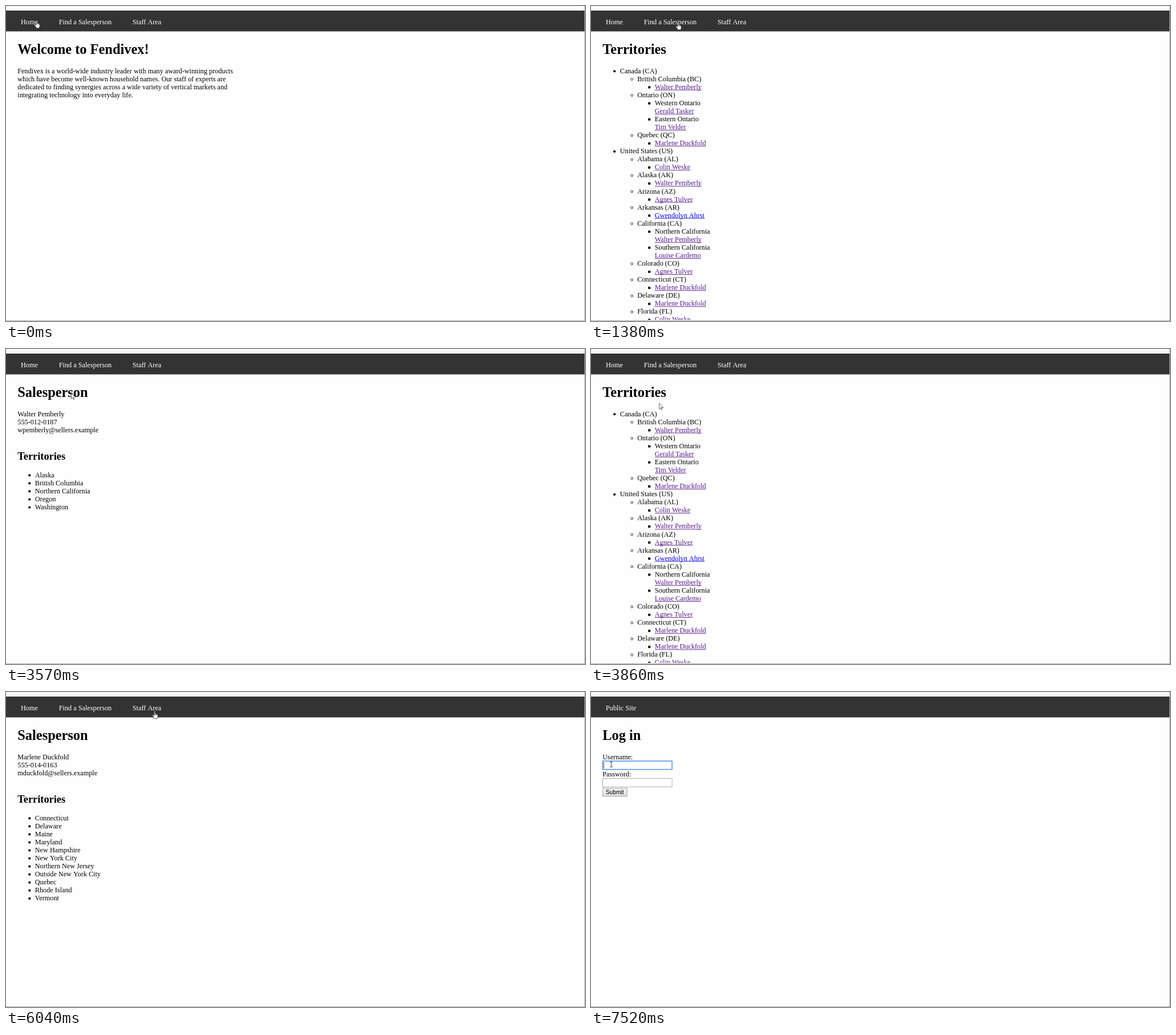
Write an HTML page with a canvas that moves like this. It is 1015x552 px and loops after 8 s.

```html
<!DOCTYPE html>
<html lang="en">
<head>
<meta charset="utf-8">
<title>Sales site walkthrough</title>
<style>
  html, body { margin: 0; width: 100%; height: 100%; overflow: hidden; background: #fefefe; }
  canvas { display: block; }
</style>
</head>
<body>
<canvas id="stage" width="1015" height="552"></canvas>
<script>
const ctx = document.getElementById('stage').getContext('2d');
const LOOP = 8000;
const LINE = 14.06;
const FIRST_LINE = 117.6;
const SERIF = '"Liberation Serif", "Times New Roman", serif';
const BODY = `12.22px ${SERIF}`;
const H1 = `bold 24.4px ${SERIF}`;
const H2 = `bold 18.33px ${SERIF}`;

// Bursts of pointer activity: first change, last change, number of changes.
const bursts = [
  [710, 1380, 5], [1790, 2360, 5], [2490, 2760, 3], [2910, 3300, 4],
  [3570, 3570, 1], [3720, 4570, 7], [4700, 4850, 2], [5000, 5620, 6],
  [5760, 6040, 3], [6160, 6670, 5], [6820, 7520, 6]
];
const changes = [0];
for (const [from, to, count] of bursts) {
  for (let i = 0; i < count; i++) {
    changes.push(Math.round(from + (count > 1 ? (to - from) * i / (count - 1) : 0)));
  }
}

// Pointer path: time, left, top, shape from that time on.
const path = [
  [0, 49, 25, 'hand'], [543, 49, 25, 'hand'], [1212, 148, 28, 'hand'],
  [1650, 148, 28, 'hand'], [1790, 150, 48, 'arrow'], [2075, 160, 136, 'hand'],
  [2217, 160, 136, 'hand'], [2360, 164.5, 141, 'beam'], [2490, 205, 168, 'arrow'],
  [2625, 224, 182, 'arrow'], [2760, 154, 219, 'arrow'], [2910, 140, 150, 'arrow'],
  [3300, 96.5, 24.5, 'hand'], [3570, 114, 77, 'arrow'], [4570, 150, 195, 'arrow'],
  [4850, 158, 227, 'arrow'], [5000, 162, 236, 'hand'], [5124, 162, 236, 'arrow'],
  [5620, 256, 35, 'hand'], [5760, 257, 28, 'hand'], [5900, 257, 23, 'hand'],
  [6040, 256, 33, 'hand'], [6160, 205, 60, 'arrow'], [6415, 115, 104, 'beam'],
  [6542, 165, 70, 'arrow'], [6670, 230, 30, 'hand'], [6820, 266, 24, 'hand'],
  [6960, 266, 24, 'arrow'], [7380, 33, 122, 'beam'], [8000, 33, 122, 'beam']
];

const links = {
  W: 'Walter Pemberly', G: 'Gerald Tasker', T: 'Tim Velder', M: 'Marlene Duckfold',
  C: 'Colin Weske', A: 'Agnes Tulver', E: 'Gwendolyn Ahrst', L: 'Louise Cardemo'
};

// Leading mark: * o # bullets by depth, _ continues the deepest level.
const territories = [
  '*Canada (CA)', 'oBritish Columbia (BC)', '#W', 'oOntario (ON)',
  '#Western Ontario', '_G', '#Eastern Ontario', '_T', 'oQuebec (QC)', '#M',
  '*United States (US)', 'oAlabama (AL)', '#C', 'oAlaska (AK)', '#W',
  'oArizona (AZ)', '#A', 'oArkansas (AR)', '#E', 'oCalifornia (CA)',
  '#Northern California', '_W', '#Southern California', '_L',
  'oColorado (CO)', '#A', 'oConnecticut (CT)', '#M', 'oDelaware (DE)', '#M',
  'oFlorida (FL)', '#C'
];

function text(str, x, y, font = BODY, color = '#000') {
  ctx.font = font;
  ctx.fillStyle = color;
  ctx.fillText(str, x, y);
}

function lines(list, x, y) {
  list.forEach((str, i) => text(str, x, y + i * LINE));
}

function link(str, x, y, color) {
  text(str, x, y, BODY, color);
  ctx.fillRect(x, y + 1, ctx.measureText(str).width, 0.9);
}

function bullet(mark, x, y) {
  ctx.fillStyle = ctx.strokeStyle = '#000';
  ctx.lineWidth = 0.8;
  if (mark === '#') {
    ctx.fillRect(x - 2, y - 2, 4, 4);
    return;
  }
  ctx.beginPath();
  ctx.arc(x, y, mark === '*' ? 2.1 : 1.9, 0, Math.PI * 2);
  if (mark === '*') ctx.fill();
  else ctx.stroke();
}

function listItem(item, y) {
  const mark = item[0];
  const label = item.slice(1);
  const depth = mark === '*' ? 0 : mark === 'o' ? 1 : 2;
  const x = 50.8 + depth * 30.5;
  if (mark !== '_') bullet(mark, x - 9.6, y - 3.3);
  if (links[label]) link(links[label], x, y, label === 'E' ? '#0000ee' : '#551a8b');
  else text(label, x, y);
}

function listItems(items, top) {
  items.forEach((item, i) => listItem(item, top + i * LINE));
}

function nav(items) {
  ctx.fillStyle = '#333';
  ctx.fillRect(0, 8, 1014, 36.5);
  for (const [label, x] of items) text(label, x, 31.5, BODY, '#fff');
}

function publicPage(title) {
  nav([['Home', 26], ['Find a Salesperson', 92.8], ['Staff Area', 221.8]]);
  text(title, 20.3, 83.8, H1);
}

function homePage() {
  publicPage('Welcome to Fendivex!');
  lines([
    'Fendivex is a world-wide industry leader with many award-winning products',
    'which have become well-known household names. Our staff of experts are',
    'dedicated to finding synergies across a wide variety of vertical markets and',
    'integrating technology into everyday life.'
  ], 20.3, FIRST_LINE);
}

function territoriesPage() {
  publicPage('Territories');
  listItems(territories, FIRST_LINE);
}

function salespersonPage(contact, areas) {
  publicPage('Salesperson');
  lines(contact, 20.3, FIRST_LINE);
  text('Territories', 20.3, 193.8, H2);
  listItems(areas.map(area => '*' + area), 224.6);
}

function inputBox(y, focused) {
  ctx.fillStyle = '#fff';
  ctx.fillRect(20, y, 122.5, 15.5);
  ctx.strokeStyle = focused ? '#4d90f0' : '#adadad';
  ctx.lineWidth = focused ? 1.5 : 1;
  ctx.strokeRect(20.5, y + 0.5, 121.6, 14.7);
}

function loginPage(t) {
  const focused = t >= 7520;
  nav([['Public Site', 26]]);
  text('Log in', 20.3, 83.8, H1);
  text('Username:', 20.3, FIRST_LINE);
  inputBox(120.5, focused);
  if (focused) {
    ctx.fillStyle = '#333';
    ctx.fillRect(21.8, 123, 0.9, 10.5);
  }
  text('Password:', 20.3, 148.4);
  inputBox(151, false);

  const shade = ctx.createLinearGradient(0, 168, 0, 183);
  shade.addColorStop(0, '#f6f6f6');
  shade.addColorStop(1, '#dcdcdc');
  ctx.fillStyle = shade;
  ctx.fillRect(20, 168, 43.5, 15.2);
  ctx.strokeStyle = '#a3a3a3';
  ctx.lineWidth = 1;
  ctx.strokeRect(20.5, 168.5, 42.6, 14.3);
  text('Submit', 25.8, 179, '10.2px "Liberation Sans", Arial, sans-serif');
}

const walter = () => salespersonPage(
  [links.W, '555-012-0187', 'wpemberly@sellers.example'],
  ['Alaska', 'British Columbia', 'Northern California', 'Oregon', 'Washington']);

const marlene = () => salespersonPage(
  [links.M, '555-014-0163', 'mduckfold@sellers.example'],
  ['Connecticut', 'Delaware', 'Maine', 'Maryland', 'New Hampshire', 'New York City',
   'Northern New Jersey', 'Outside New York City', 'Quebec', 'Rhode Island', 'Vermont']);

const pages = [
  [0, homePage], [1380, territoriesPage], [2217, walter],
  [3720, territoriesPage], [5124, marlene], [6960, loginPage]
];

const handShape = new Path2D(
  'M6 14V2Q6 .5 7.2 .5T8.6 2V8L10 7.8Q11.3 7.8 12 8.8L14 9.2Q15 9.2 15.4 10' +
  'Q16.5 10.2 16.5 12V16L14.8 21.5H6.5L5.5 18.5L1 12.5Q.5 10.8 2.2 10.6L4 11.8Z');
const handFolds = new Path2D('M8.6 8V12M12 9V12.5M15 10.2V13');
const arrowShape = new Path2D('M.5 .5V16.5L4.2 13L6.5 18.5L8.8 17.5L6.5 12.2H11.5Z');
const beamShape = new Path2D('M0 .5H2L2.5 1L3 .5H5M2.5 1V9M0 9.5H2L2.5 9L3 9.5H5');

const pointers = {
  hand() {
    ctx.scale(0.62, 0.64);
    ctx.fillStyle = '#fff';
    ctx.fill(handShape);
    ctx.strokeStyle = '#222';
    ctx.stroke(handShape);
    ctx.stroke(handFolds);
  },
  arrow() {
    ctx.scale(0.64, 0.64);
    ctx.fillStyle = '#fff';
    ctx.fill(arrowShape);
    ctx.strokeStyle = '#222';
    ctx.stroke(arrowShape);
  },
  beam() {
    ctx.strokeStyle = '#333';
    ctx.lineWidth = 0.9;
    ctx.stroke(beamShape);
  }
};

function drawPointer(t) {
  const next = Math.max(1, path.findIndex(key => key[0] > t));
  const [t0, x0, y0, shape] = path[next - 1];
  const [t1, x1, y1] = path[next];
  const k = (t - t0) / (t1 - t0);
  ctx.save();
  ctx.translate(x0 + (x1 - x0) * k, y0 + (y1 - y0) * k);
  ctx.lineWidth = 1.1;
  ctx.lineJoin = 'round';
  pointers[shape]();
  ctx.restore();
}

function draw(now) {
  const time = now % LOOP;
  const t = changes.filter(change => change <= time).pop();
  ctx.fillStyle = '#fefefe';
  ctx.fillRect(0, 0, 1015, 552);
  ctx.fillStyle = '#f9f9fc';
  ctx.fillRect(0, 0, 1014, 8);
  pages.filter(([start]) => start <= t).pop()[1](t);
  ctx.fillStyle = '#fefefe';
  ctx.fillRect(0, 550, 1014, 1);
  ctx.fillStyle = '#ababab';
  ctx.fillRect(0, 551, 1015, 1);
  ctx.fillRect(1014, 0, 1, 552);
  drawPointer(t);
}

const start = performance.now();
function tick() {
  draw(performance.now() - start);
  requestAnimationFrame(tick);
}
tick();
</script>
</body>
</html>
```
